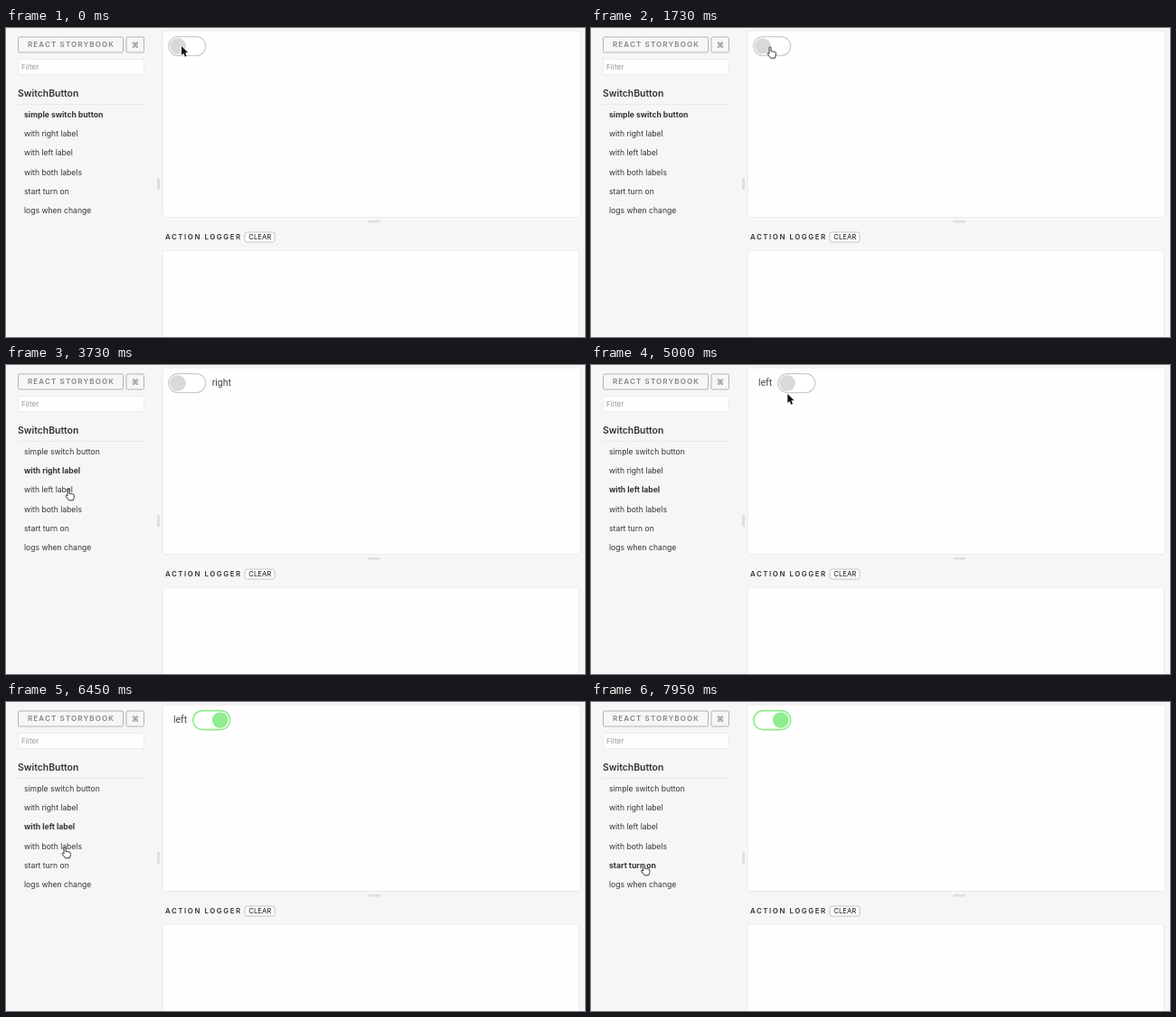
An HTML page that plays this animation: 640 by 342 pixels, repeating every 8 s.

```html
<!DOCTYPE html>
<html>
<head>
<meta charset="utf-8">
<style>
html, body { margin: 0; width: 100%; height: 100%; overflow: hidden; background: #f6f6f7 }
svg { display: block; width: 100%; height: 100% }
text { font-family: Inter, sans-serif; fill: #333; font-size: 8.6px; white-space: pre }
.panel { fill: #fefefe; stroke: #ebebec }
.button { fill: none; stroke: #b3b3b3 }
.grip { fill: #dfdfe0 }
.muted { fill: #858585; font-weight: 600 }
.label { font-family: Roboto, sans-serif; font-size: 10.5px; fill: #444 }
</style>
</head>
<body>
<svg viewBox="0 0 640 342">
  <rect class="button" x="13.5" y="10" width="116" height="17" rx="1.5"/>
  <rect class="button" x="133" y="10" width="19.5" height="17" rx="1.5"/>
  <text class="muted" x="24" y="21.3" style="font-size:8px;letter-spacing:1.14px">REACT STORYBOOK</text>
  <text class="muted" x="142.8" y="21.5" text-anchor="middle" style="font-size:8.5px">⌘</text>
  <rect class="panel" x="13.5" y="34.5" width="139" height="17" rx="1.5"/>
  <text x="17" y="46.2" style="font-size:8.2px;fill:#999">Filter</text>
  <text x="13" y="75.7" style="font-size:10.4px;font-weight:600">SwitchButton</text>
  <path d="M13 84.5H153" stroke="#e9e9ea"/>
  <g id="menu"></g>
  <rect class="grip" x="167" y="166" width="3" height="13" rx="1"/>
  <rect class="grip" x="400" y="213" width="14" height="2.5" rx="1"/>
  <rect class="panel" x="173" y="3" width="462" height="206.5" rx="3"/>
  <rect class="panel" x="173" y="246" width="460.5" height="120" rx="3"/>
  <text x="176" y="234" style="font-size:7.8px;font-weight:600;letter-spacing:1.6px">ACTION LOGGER</text>
  <rect x="264" y="226" width="33" height="11" rx="2.5" fill="#fff" stroke="#b5b5b5" stroke-width=".8"/>
  <text x="268.3" y="234.2" style="font-size:7.7px;fill:#111">CLEAR</text>

  <text class="label" id="left" x="185" y="22.7">left</text>
  <g id="toggle">
    <rect id="track" x=".7" y="9.6" width="41" height="21" rx="10.5" fill="#fff"/>
    <circle id="knob" cy="20" r="8.8"/>
  </g>
  <text class="label" id="right" y="22.7">right</text>

  <g id="cursor" stroke-linejoin="round">
    <path id="arrow" d="M0 0v10l2.3-2.1 1.6 3.8 1.8-.8-1.6-3.6h3.1z" fill="#111" stroke="#fff" stroke-width="1.2" paint-order="stroke"/>
    <path id="hand" d="M-1 7.5V1a1 1 0 0 1 2 0V5q1-.9 1.9.2 1-.6 1.8.4 1.6-.3 1.6 1.2v2.2l-1.1 3.3H.6L-2.6 8.2q-.8-1.2.2-1.5.8 0 1.4.8z" fill="#fff" stroke="#222" stroke-width=".9"/>
  </g>
</svg>
<script>
const $ = id => document.getElementById(id);
const LOOP = 8000, SLIDE = 400;

const items = ['simple switch button', 'with right label', 'with left label',
  'with both labels', 'start turn on', 'logs when change'].map((name, i) => {
  const item = document.createElementNS('http://www.w3.org/2000/svg', 'text');
  item.textContent = name;
  item.setAttribute('x', 20);
  item.setAttribute('y', 99 + i * 21.2);
  return $('menu').appendChild(item);
});

// Each story: start time, menu index, labels, initial state and switch clicks
const stories = [
  { at: 0, item: 0, clicks: [530, 1340] },
  { at: 2770, item: 1, right: true, clicks: [] },
  { at: 4040, item: 2, left: true, clicks: [5220] },
  { at: 6740, item: 3, left: true, right: true, clicks: [] },
  { at: 7690, item: 4, on: 1, clicks: [] }
];

// Pointer stops: time, x, y
const path = [
  [50, 194, 20], [360, 198, 21], [1910, 198, 21], [2360, 84.5, 105], [2550, 75, 112],
  [3320, 75, 112], [3730, 69, 137.5], [4180, 69, 137.5], [4950, 212.5, 41],
  [5000, 217.3, 32], [5090, 228, 22], [5560, 228, 22], [6000, 72, 106],
  [6450, 65, 160.5], [6860, 65, 160.5], [7640, 58.5, 179.5]
];

const clamp = v => Math.min(1, Math.max(0, v));
const ease = v => v * v * (3 - 2 * v);
const mix = (a, b, p) => a + (b - a) * p;
const blend = (a, b, p) => `rgb(${a.map((v, i) => Math.round(mix(v, b[i], p)))})`;
const GREEN = [144, 238, 144];

function pointerAt(t) {
  const next = path.findIndex(stop => stop[0] > t);
  if (next < 0) return path[path.length - 1].slice(1);
  if (!next) return path[0].slice(1);
  const [a, b] = [path[next - 1], path[next]];
  const p = ease((t - a[0]) / (b[0] - a[0]));
  return [mix(a[1], b[1], p), mix(a[2], b[2], p)];
}

function draw(t) {
  const story = stories.filter(s => s.at <= t).pop();
  items.forEach((item, i) => item.style.fontWeight = i === story.item ? 700 : 400);

  let on = story.on || 0;
  for (const click of story.clicks) {
    if (t >= click) on = mix(on, on < .5 ? 1 : 0, ease(clamp((t - click) / SLIDE)));
  }
  const x = story.left ? 206 : 179;
  $('toggle').setAttribute('transform', `translate(${x})`);
  $('track').style.stroke = blend([204, 204, 204], GREEN, on);
  $('track').style.strokeWidth = mix(1.2, 1.6, on);
  $('knob').style.fill = blend([217, 217, 217], GREEN, on);
  $('knob').setAttribute('cx', mix(11, 30.7, on));
  $('left').style.display = story.left ? '' : 'none';
  $('right').style.display = story.right ? '' : 'none';
  $('right').setAttribute('x', x + 48.7);

  const [px, py] = pointerAt(t);
  const overMenu = px < 110 && py > 88;
  const overSwitch = px > x && px < x + 42 && py > 20.4 && py < 31;
  const hand = overMenu || overSwitch;
  $('cursor').setAttribute('transform', `translate(${px} ${py})`);
  $('hand').style.display = hand ? '' : 'none';
  $('arrow').style.display = hand ? 'none' : '';
}

const start = performance.now();
(function frame() {
  draw((performance.now() - start) % LOOP);
  requestAnimationFrame(frame);
})();
</script>
</body>
</html>
```
